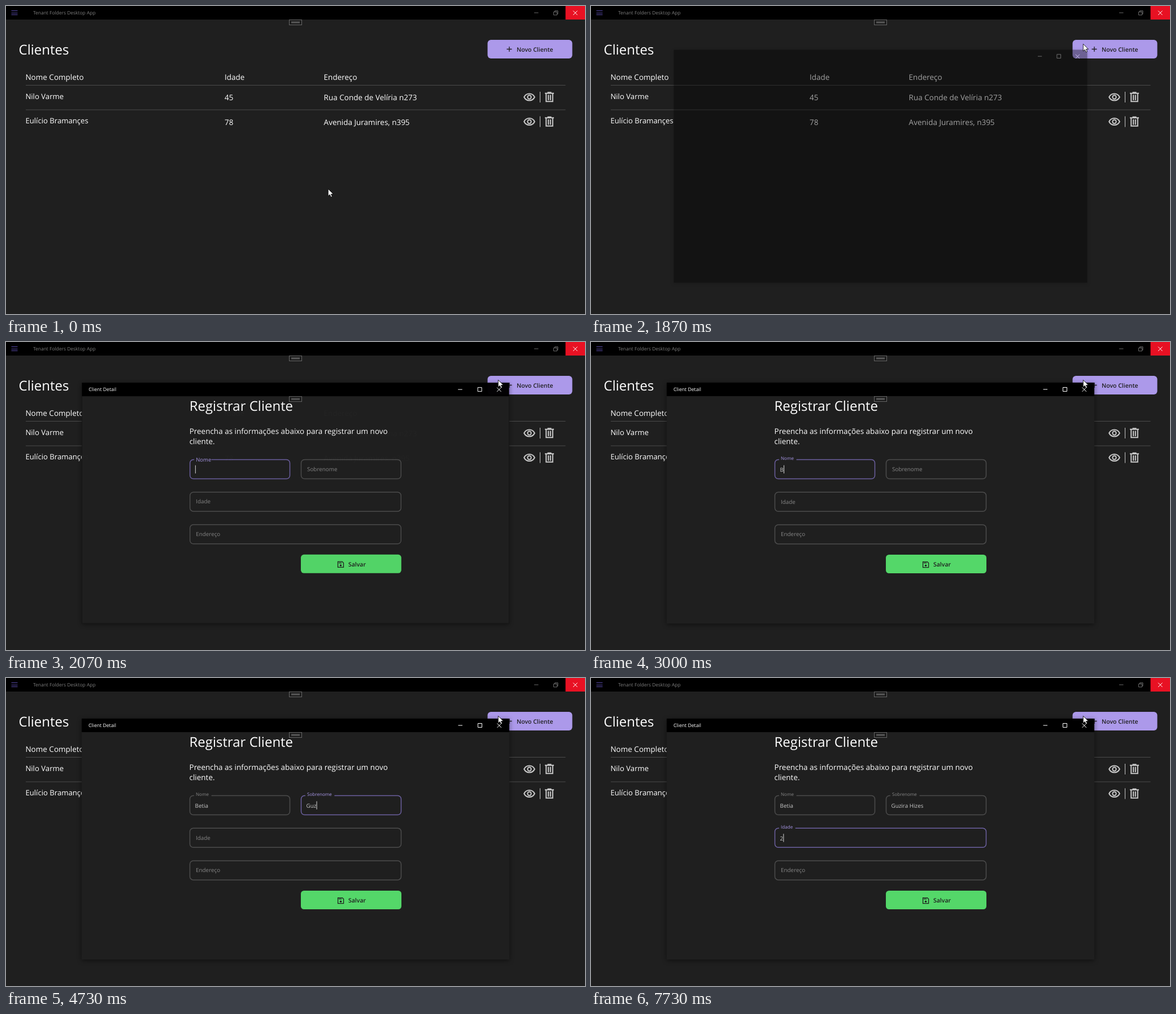
Write an HTML page that moves like this. It is 1025 by 546 pixels and loops after 8 s.

```html
<!DOCTYPE html>
<html lang="pt">
<head>
<meta charset="utf-8">
<title>Clientes</title>
<style>
html, body { margin: 0; width: 100%; height: 100%; overflow: hidden; background: #1f1f1f; }
svg { display: block; width: 1025px; height: 546px; font: 13.5px "Open Sans", "Noto Sans", sans-serif; fill: #fff; }
text { white-space: pre; text-rendering: geometricPrecision; }
.line { fill: none; stroke: #fff; }
.h1 { font-size: 24px; }
.name { font-size: 13.15px; }
.btn { font-size: 10.5px; font-weight: 600; fill: #1f1f1f; }
.icon { fill: none; stroke: #c8c8c8; stroke-width: 2; }
.ink { fill: none; stroke: #1f1f1f; stroke-width: 1.3; }
.value { font-size: 9.9px; fill: #c6c6c6; }
.box { fill: none; stroke: #4c4c4c; stroke-width: 1.5; }
.label { fill: #868686; }
.caret { fill: #d8d8d8; }
.focus .box { stroke: #6c60a0; }
.focus .label { fill: #a998e8; }
#shell { filter: drop-shadow(0 2px 4px #0007); }
</style>
</head>
<body>
<svg viewBox="0 0 1025 546">
  <defs>
    <g id="handle">
      <rect x="501.5" y=".5" width="22" height="9" fill="#1c1c1c" stroke="#666"/>
      <rect x="505" y="3.5" width="15" height="3" fill="#585858"/>
    </g>
    <g id="actions">
      <g class="icon">
        <path d="M917.2 161.5C918.9 157.8 922.5 155.5 926.5 155.5S934.1 157.8 935.8 161.5C934.1 165.2 930.5 167.5 926.5 167.5S918.9 165.2 917.2 161.5Z"/>
        <circle cx="926.5" cy="161.5" r="3.2"/>
        <path d="M954 154.8H970M958.5 153.2H965.5M956.2 155V169.2H967.8V155M960.2 157.5V167M963.8 157.5V167"/>
      </g>
      <path class="line" d="M945.5 152V171" style="stroke:#c8c8c8"/>
    </g>
  </defs>

  <rect width="1025" height="546" fill="#1f1f1f"/>
  <rect width="1025" height="24" fill="#000"/>
  <path d="M9.5 8.5H20.5M9.5 12.5H20.5M9.5 15.5H20.5" stroke="#5a4cae"/>
  <text x="48" y="15.3" font-size="8.45" fill="#7d7d7d">Tenant Folders Desktop App</text>
  <path id="caption" class="line" d="M935 12H942.5M969.5 10.5H975.5V16H969.5ZM971.5 10V8.5H977V14H975.5"/>
  <rect x="990.5" width="34.5" height="24" fill="#e81123"/>
  <path class="line" d="M1004 8.5L1011.5 16M1011.5 8.5L1004 16"/>
  <use href="#handle" y="24"/>

  <text class="h1" x="22.5" y="86">Clientes</text>
  <rect x="852.5" y="60" width="150" height="33" rx="6" fill="#ac99ea"/>
  <path class="ink" d="M886.5 76.5H895.5M891 72V81"/>
  <text class="btn" x="904" y="80.7">Novo Cliente</text>

  <text x="34.4" y="131">Nome Completo</text>
  <text x="387" y="131">Idade</text>
  <text x="562.6" y="131">Endereço</text>
  <path d="M35 140.5H990.5M35 184H990.5" stroke="#4b4b4b"/>
  <text class="name" x="34.4" y="165">Nilo Varme</text>
  <text x="387" y="167">45</text>
  <text x="562.6" y="167">Rua Conde de Velíria n273</text>
  <use href="#actions"/>
  <text class="name" x="34.4" y="208.3">Eulício Bramançes</text>
  <text x="387" y="210.5">78</text>
  <text x="562.6" y="210.5">Avenida Juramires, n395</text>
  <use href="#actions" y="43.5"/>

  <g id="modal">
    <rect id="shell" x="134" y="72" width="757" height="427" fill="#000"/>
    <path class="line" d="M800.5 84H808M835.5 80.5H842.5V87.5H835.5ZM869.5 80.5L877 88M877 80.5L869.5 88"/>
    <g id="content">
      <rect x="134" y="96" width="757" height="403" fill="#1f1f1f"/>
      <text x="146" y="87.2" font-size="8.7">Client Detail</text>
      <use href="#handle" y="96"/>
      <text class="h1" x="324.5" y="122">Registrar Cliente</text>
      <text x="324.5" y="162.5">Preencha as informações abaixo para registrar um novo</text>
      <text x="324.5" y="181">cliente.</text>
      <g id="form"></g>
      <rect x="522" y="377" width="178" height="33" rx="5.5" fill="#54d769"/>
      <path class="ink" d="M587.6 389.6H595.4L597.6 391.8V399.6H587.6ZM589 391.7H594.3"/>
      <circle cx="592.6" cy="396.2" r="1.7" fill="#1f1f1f"/>
      <text class="btn" x="606" y="398.2">Salvar</text>
    </g>
  </g>
  <path id="cursor" d="M0 0V12.7L3 10 5 14.5 7.1 13.5 5.2 9.2H9.2Z" stroke="#000" stroke-width=".8"/>
</svg>
<script>
const LOOP = 8000, STEP = 200 / 3, NEVER = Infinity;
const $ = id => document.getElementById(id);

// Each field: place, label, focus span, typed text and the moment of each keystroke
const fields = [
  { x: 325, y: 208, w: 178, label: 'Nome', from: 2065, to: 4000, text: 'Betia',
    keys: [3000, 3200, 3400, 3600, 3730] },
  { x: 522, y: 208, w: 178, label: 'Sobrenome', from: 4000, to: 6470, text: 'Guzira Hizes',
    keys: [4400, 4600, 4730, 5000, 5130, 5130, 5270, 5530, 5670, 5800, 5870, 6070] },
  { x: 325, y: 265.7, w: 375, label: 'Idade', from: 6470, to: NEVER, text: '2', keys: [7730] },
  { x: 325, y: 323.4, w: 375, label: 'Endereço', from: NEVER, to: NEVER, text: '', keys: [] }
];

function set(el, attrs) {
  for (const key in attrs) el.setAttribute(key, attrs[key]);
}

function add(parent, tag, attrs) {
  const el = document.createElementNS('http://www.w3.org/2000/svg', tag);
  set(el, attrs);
  return parent.appendChild(el);
}

for (const f of fields) {
  f.group = add($('form'), 'g', {});
  add(f.group, 'rect', { class: 'box', x: f.x + .5, y: f.y + .5, width: f.w - 1, height: 34, rx: 6 });
  f.gap = add(f.group, 'rect', { x: f.x + 8, y: f.y - 2, height: 4, fill: '#1f1f1f' });
  f.tag = add(f.group, 'text', { class: 'label', x: f.x + 11 });
  f.tag.textContent = f.label;
  f.value = add(f.group, 'text', { class: 'value', x: f.x + 9.5, y: f.y + 21.8 });
  f.caret = add(f.group, 'rect', { class: 'caret', y: f.y + 10.5, width: 1, height: 14.5 });
}

function drawField(f, t) {
  const focused = t >= f.from && t < f.to;
  const floating = t >= f.from, rising = floating && t < f.from + 60;
  const [size, dy] = !floating ? [9.9, 20.8] : rising ? [9.5, 3.7] : [8.1, 1.3];
  set(f.group, { class: focused ? 'focus' : '' });
  set(f.tag, { 'font-size': size, y: f.y + dy });
  set(f.gap, { width: floating ? f.tag.getComputedTextLength() * 8.1 / size + 7.5 : 0 });
  f.value.textContent = f.text.slice(0, f.keys.filter(k => t >= k).length);
  const typed = f.value.textContent ? f.value.getComputedTextLength() : 0;
  set(f.caret, { x: f.x + 9.7 + typed, visibility: focused ? 'inherit' : 'hidden' });
}

// Number of ticks passed since a start time, at most max
const ticks = (t, from, max) => Math.max(0, Math.min(max, Math.floor((t - from) / STEP) + 1));

const ALPHA = [0, .1, .36, .66, .89, .98, 1];
const SCALE = [.95, .955, .967, .983, .992, .999, 1];

function drawModal(t) {
  const i = ticks(t, 1798, 6);
  set($('modal'), {
    opacity: ALPHA[i],
    transform: `translate(512.5 240) scale(${SCALE[i]}) translate(-512.5 -240)`
  });
  set($('content'), { visibility: t >= 2065 ? 'visible' : 'hidden' });
}

function drawCursor(t) {
  const p = ticks(t, 528, 11) / 11;
  const ease = p * p * (3 - 2 * p);
  set($('cursor'), { transform: `translate(${570.3 + 301 * ease} ${324.3 - 257 * ease})` });
}

let start;
function draw(now) {
  start ??= now;
  const t = (now - start) % LOOP;
  $('caption').style.stroke = t >= 1530 && t < 1800 ? '#fff' : '#6a6a6a';
  drawCursor(t);
  drawModal(t);
  for (const f of fields) drawField(f, t);
  requestAnimationFrame(draw);
}
requestAnimationFrame(draw);
</script>
</body>
</html>
```
